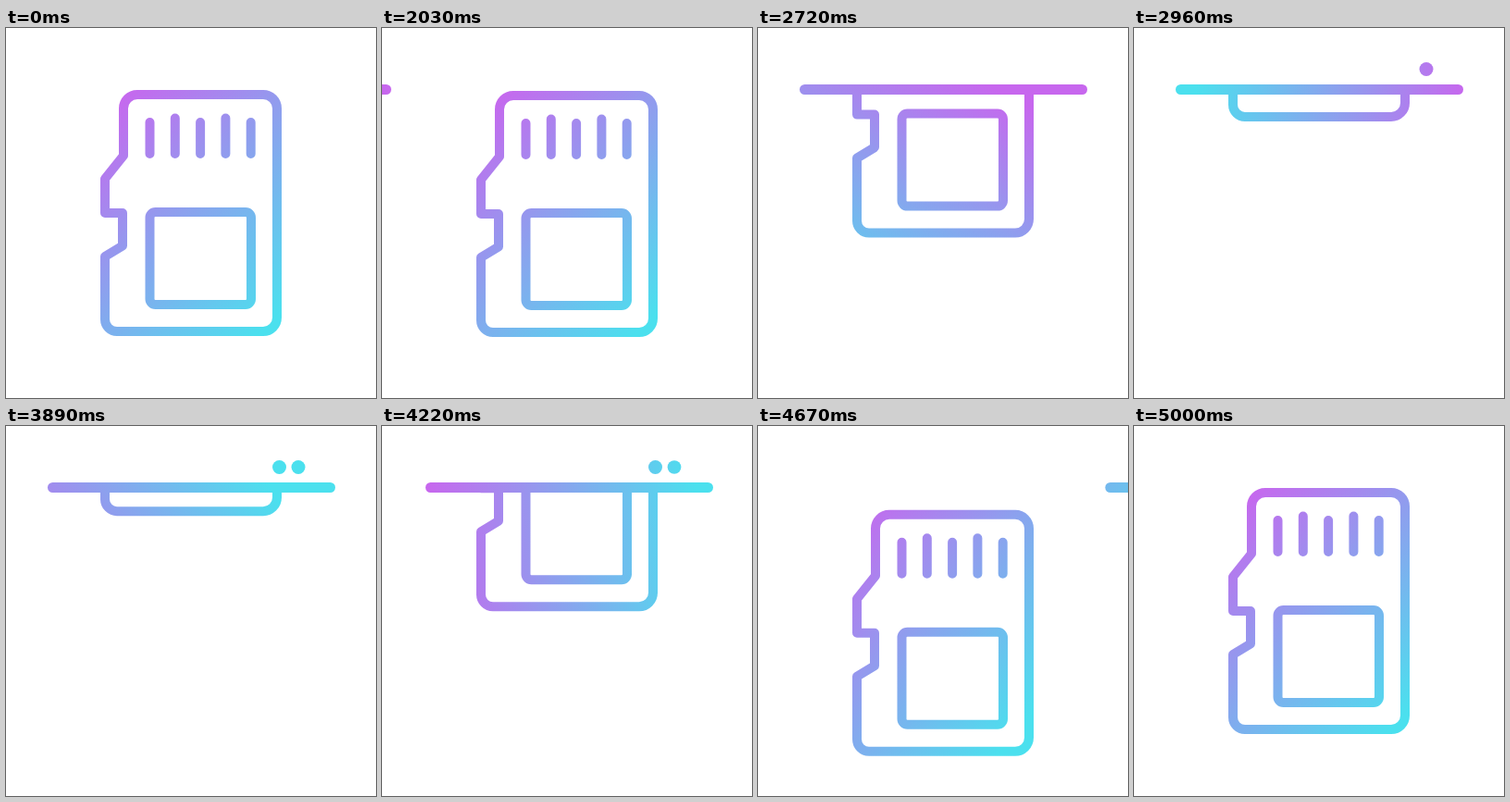
Animation of 400x400 px, one loop 5120 ms. Source, as an HTML page with a canvas:

```html
<!DOCTYPE html>
<html lang="en">
<head>
<meta charset="utf-8">
<title>Memory card</title>
<style>
  html, body { margin: 0; width: 100%; height: 100%; overflow: hidden; background: #fff; }
  canvas { display: block; }
</style>
</head>
<body>
<canvas id="stage" width="400" height="400"></canvas>
<script>
const ctx = document.getElementById('stage').getContext('2d');
const LOOP = 5120, START = 2030, END = 5000, STEP = 30;

const progress = (t, a, b) => Math.min(1, Math.max(0, (t - a) / (b - a)));
const smooth = p => p * p * (3 - 2 * p);
const cubic = p => p < .5 ? 4 * p ** 3 : 1 - 4 * (1 - p) ** 3;
const ramp = (t, a, b, ease = smooth) => ease(progress(t, a, b));

const card = new Path2D(
  'M127 138V87A15 15 0 0 1 142 72H278A15 15 0 0 1 293 87V313A15 15 0 0 1 278 328' +
  'H120A13 13 0 0 1 107 315V247L126 235.5V200H107V163Z');
card.roundRect(155.5, 199, 109.5, 100, 6);
for (let i = 0; i < 5; i++) {
  const x = 155.5 + i * 27.3;
  card.moveTo(x, i % 2 ? 97.5 : 102);
  card.lineTo(x, 136);
}

// Dip below the reader, slide in behind it, then drop out and settle.
const cardOffset = t =>
  55 * ramp(t, 2000, 2375)
  - 289 * ramp(t, 2374, 3039, cubic)
  - 2 * ramp(t, 3620, 3880)
  + 261 * ramp(t, 3850, 4650, cubic)
  - 25 * ramp(t, 4620, 5000);

const gradientAngle = t =>
  45 + 275 * ramp(t, 2250, 3650) + 85 * ramp(t, 3680, 4850);

function readerEnds(t) {
  const shift = -361 * (1 - ramp(t, 1960, 2530));
  const u = Math.max(0, (t - 3900) / 500);
  return [45 + shift + 27 * u ** 5.8, 356 + shift + 16 * u ** 4.7];
}

function makePaint(degrees) {
  const a = degrees * Math.PI / 180;
  const dx = 145 * Math.cos(a), dy = 145 * Math.sin(a);
  const g = ctx.createLinearGradient(200 - dx, 200 - dy, 200 + dx, 200 + dy);
  g.addColorStop(0, '#c767ee');
  g.addColorStop(1, '#4be0ee');
  return g;
}

function drawCard(offset) {
  const moved = new Path2D();
  moved.addPath(card, new DOMMatrix().translate(0, offset));
  ctx.save();
  ctx.beginPath();
  ctx.rect(0, 66, 400, 334);
  ctx.clip();
  ctx.lineWidth = 10;
  ctx.stroke(moved);
  ctx.restore();
}

function drawReader(left, right) {
  if (left > 400) return;
  ctx.lineWidth = 11;
  ctx.beginPath();
  ctx.moveTo(left + 5.5, 66.5);
  ctx.lineTo(Math.max(left, right - 11) + 5.5, 66.5);
  ctx.stroke();
}

function drawLight(x, size) {
  ctx.beginPath();
  ctx.arc(x, 44.5, 7.5 * size, 0, 2 * Math.PI);
  ctx.fill();
}

function draw(now) {
  const time = now % LOOP;
  const t = time < START ? 0
    : Math.min(END, START + STEP * Math.floor((time - START) / STEP));
  ctx.clearRect(0, 0, 400, 400);
  ctx.strokeStyle = ctx.fillStyle = makePaint(gradientAngle(t));
  ctx.lineCap = ctx.lineJoin = 'round';
  drawCard(cardOffset(t));
  if (t >= START) {
    drawReader(...readerEnds(t));
    drawLight(316, ramp(t, 2800, 2930) - ramp(t, 4210, 4340));
    drawLight(295.5, ramp(t, 3200, 3330) - ramp(t, 4430, 4560));
  }
}

const origin = performance.now();
function tick() {
  draw(performance.now() - origin);
  requestAnimationFrame(tick);
}
tick();
</script>
</body>
</html>
```
